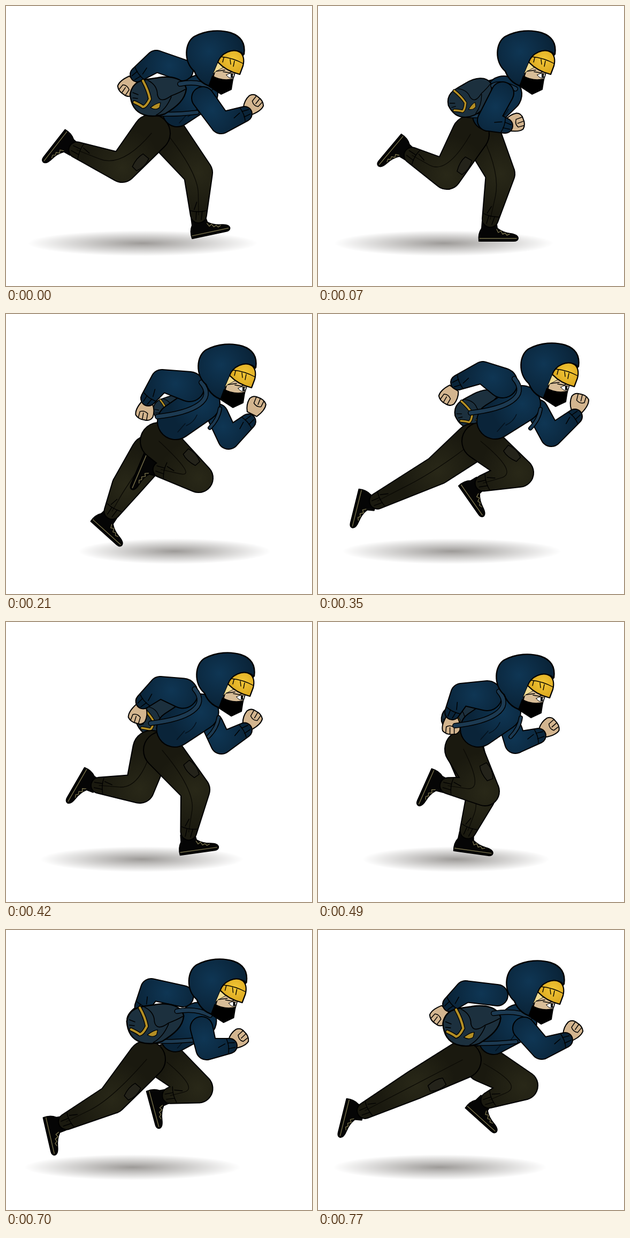
Animation of 572x524 px, one loop 0.84 s. Source, as an HTML page with a canvas:

```html
<!DOCTYPE html>
<html lang="en">
<head>
<meta charset="utf-8">
<title>Run cycle</title>
<style>
  html, body { margin: 0; height: 100%; overflow: hidden; background: #fff; }
  canvas { display: block; }
</style>
</head>
<body>
<canvas id="stage" width="572" height="524"></canvas>
<script>
const STEPS = 12, STEP_MS = 70;
const ctx = document.getElementById('stage').getContext('2d');
const { PI, cos, sin, atan2, acos, hypot } = Math;

// One row per step; an empty step is the mean of its neighbours.
const track = rows => Array.from({ length: STEPS }, (_, i) =>
  rows[i] || rows[i - 1].map((v, k) => (v + rows[i + 1][k]) / 2));

// hip x,y  knee x,y  ankle x,y  foot angle
const nearLeg = track([
  [272, 238, 217, 303, 124, 266, 128], [285, 240, 241, 316, 168, 275, 130], ,
  [286, 238, 360, 307, 281, 289, 113], , [304, 238, 376, 297, 300, 319, 55],
  [292, 240, 354, 314, 340, 402, -8], [275, 240, 304, 328, 277, 399, 8], ,
  [256, 241, 215, 344, 130, 383, 50], , [270, 243, 182, 289, 80, 342, 104]]);
const farLeg = track([
  [300, 238, 359, 312, 360, 400, -12], [308, 245, 341, 314, 320, 408, 0], ,
  [268, 262, 225, 322, 194, 377, 42], , [290, 240, 224, 292, 103, 354, 104],
  [272, 238, 250, 312, 165, 305, 120], [272, 238, 312, 317, 234, 305, 114], ,
  [292, 245, 335, 302, 286, 302, 108], , [310, 250, 384, 291, 311, 322, 42]]);

// shoulder x,y  elbow x,y  wrist x,y  hand x,y
const nearArm = track([
  [368, 172, 402, 219, 446, 202, 462, 185], [345, 163, 318, 214, 350, 224, 368, 219], ,
  [343, 136, 291, 124, 266, 158, 260, 181], , [345, 129, 308, 109, 262, 128, 245, 152], ,
  [316, 138, 268, 135, 251, 169, 249, 193], , [346, 182, 332, 224, 374, 228, 393, 219], ,
  [385, 184, 418, 222, 462, 206, 476, 189]]);
const farArm = track([
  [330, 120, 281, 103, 246, 128, 228, 150], [340, 155, 312, 162, 310, 178, 318, 190], ,
  [395, 188, 416, 233, 453, 201, 467, 173], , [410, 180, 436, 228, 480, 192, 488, 167], ,
  [362, 203, 369, 226, 412, 213, 432, 198], , [326, 126, 267, 107, 262, 148, 262, 165], ,
  [335, 122, 276, 115, 247, 139, 228, 160]]);

// chest x,y  waist x,y
const torso = track([
  [362, 163, 320, 199], [347, 165, 316, 205], , [366, 167, 317, 201], , [382, 168, 331, 200], ,
  [345, 169, 300, 200], , [344, 166, 305, 196], , [375, 173, 328, 206]]);
const head = track([[0, 0], [-2, 0], , [22, 10], , [42, 8], , [-4, 14], , [-6, 5], , [15, 11]]);
// x, y, angle, scale
const bag = track([
  [285, 170, 0, 1], [287, 173, -22, .85], , [312, 178, -10, .7], , [300, 179, -20, .85], ,
  [276, 178, -15, .86], , [271, 172, 0, 1], , [288, 180, 0, 1.03]]);
// centre x, half width
const shadow = track([[255, 215], [235, 205], , [315, 180], , [250, 205], , [258, 175], , [245, 205], , [228, 200]]);

const glow = (x, y, r, inner, outer) => {
  const g = ctx.createRadialGradient(x, y, 0, x, y, r);
  g.addColorStop(0, inner);
  g.addColorStop(1, outer);
  return g;
};
const cloth = (x, y) => glow(x, y, 60, '#0f3654', '#0a2439');
const pants = (x, y) => glow(x, y, 75, '#292818', '#1a190f');

function line(d, color = '#000', width = 1.6) {
  ctx.strokeStyle = color;
  ctx.lineWidth = width;
  ctx.stroke(new Path2D(d));
}
function shape(d, fill, width = 2) {
  ctx.fillStyle = fill;
  ctx.fill(new Path2D(d));
  if (width) line(d, '#000', width);
}
function strap(d, width = 7) {
  line(d, '#000', width + 3);
  line(d, '#1c3a52', width);
}
function place(x, y, angle, draw, scale = 1) {
  ctx.save();
  ctx.translate(x, y);
  ctx.rotate(angle);
  ctx.scale(scale, scale);
  draw();
  ctx.restore();
}

// Tapered tube through circles [x, y, r], with one common outline.
function tube(circles, fill) {
  const path = new Path2D();
  circles.slice(1).forEach(([bx, by, br], i) => {
    const [ax, ay, ar] = circles[i];
    const dir = atan2(by - ay, bx - ax), lean = acos((ar - br) / hypot(bx - ax, by - ay));
    const part = new Path2D();
    part.arc(ax, ay, ar, dir + lean, dir - lean + 2 * PI);
    part.arc(bx, by, br, dir - lean, dir + lean);
    part.closePath();
    path.addPath(part);
  });
  ctx.strokeStyle = '#000';
  ctx.lineWidth = 4;
  ctx.stroke(path);
  ctx.fillStyle = fill;
  ctx.fill(path);
}

function shoe() {
  shape('M-13,-5 L13,-5 L15,8 Q25,16 40,18 Q54,20 54,27 Q53,32 46,32 L-19,32 Q-21,18 -14,8Z', '#050505');
  line('M-18,27 L51,27', '#77704a', 1.4);
  line('M14,10 l3,6 5,-3 3,6 5,-2 3,4 5,-2', '#77704a', 1.4);
}

function leg([hx, hy, kx, ky, ax, ay, foot], withPocket) {
  const shin = atan2(ay - ky, ax - kx), thigh = atan2(ky - hy, kx - hx);
  const ex = ax - 9 * cos(shin), ey = ay - 9 * sin(shin);
  place(ax, ay, foot * PI / 180, shoe);
  tube([[hx, hy, 34], [kx, ky, 26], [ex, ey, 14]], pants(kx, ky));
  line(`M${hx},${hy} Q${kx},${ky} ${(kx + ex) / 2},${(ky + ey) / 2} T${ex},${ey}`, '#0b0a05', 1.3);
  place(ex, ey, shin, () => line('M-8,-15 Q-4,0 -8,15 M-7,-7 l16,2 M-6,4 l15,1 M-10,8 l-14,-5', '#000', 1.4));
  if (withPocket) place(hx + .62 * (kx - hx), hy + .62 * (ky - hy), thigh, () =>
    shape('M-13,-27 Q4,-32 19,-24 L18,-13 Q0,-8 -13,-13Z', '#24231a', 1.4));
}

function fist() {
  shape('M-16,-10 Q-5,-18 8,-17 Q17,-14 17,-4 Q19,8 12,15 Q2,19 -16,10Z', '#d3b58f');
  line('M16,-7 L4,-6 M17,1 L5,2 M15,9 L4,9 M4,-6 Q-1,2 4,9', '#000', 1.5);
}

function arm([sx, sy, ex, ey, wx, wy, hx, hy], shoulder) {
  place(hx, hy, atan2(hy - wy, hx - wx), fist);
  tube([[sx, sy, shoulder], [ex, ey, 19], [wx, wy, 13]], cloth((sx + ex) / 2, (sy + ey) / 2));
  place(wx, wy, atan2(wy - ey, wx - ex), () =>
    line('M-4,-14 Q0,0 -4,14 M-3,-6 l13,1 M-3,5 l13,-1 M-8,-5 l-13,5', '#000', 1.5));
}

function backpack([x, y, angle, scale]) {
  place(x, y, angle * PI / 180, () => {
    shape('M-53,-5 C-48,-35 -20,-32 0,-36 C25,-40 48,-34 52,-15 C50,5 35,18 12,32 C-10,40 -50,40 -53,-5Z', '#1c303e', 2.4);
    line('M-20,-31 Q-2,-22 -2,-4 Q2,14 24,-2 M24,-2 Q40,-8 50,-14 M-4,34 Q14,24 24,0 M-48,-8 l10,4 M-48,2 l9,1');
    const trim = 'M-29,-30 Q-19,-12 -16,4 Q-23,18 -29,19 Q-34,15 -45,10';
    line(trim, '#000', 7);
    line(trim, '#b48f25', 4.2);
    shape('M4,11 Q-3,11 -15,20 Q-5,26 2,20Z', '#b48f25', 1.2);
  }, scale);
}

function face() {
  shape('M352,122 C331,104 334,68 352,57 C375,45 400,44 420,50 C438,56 448,68 445,90 L390,152 Q362,148 352,122Z', cloth(380, 85), 2.4);
  shape('M445,90 C438,80 415,82 404,92 C392,105 388,130 381,150 L395,156 L425,125Z', '#04070a', 0);
  shape('M397,103 L428,126 L424,139 L386,138Z', '#d8bd98', 1.2);
  shape('M396,106 L408,114 L393,122 L387,127Z', '#f0db92', .8);
  shape('M386,131 Q402,141 424,137 L421,156 L402,165 L379,150Z', '#000');
  shape('M412,129 Q419,124 427,128 L424,135 Q416,136 412,129Z', '#fff', 1);
  shape('M420,127 h4 v7 h-4Z', '#000', 0);
  line('M406,123 L418,125 L428,121 M393,122 L409,120', '#000', 1.6);
  shape('M396,105 C402,88 424,78 438,87 C447,95 444,108 443,112 L437,128 Q412,122 396,105Z', glow(424, 100, 30, '#f2c636', '#d9a51d'), 2.2);
  line('M402,95 Q424,97 444,108 M407,97 l-2,8 M419,100 l1,9 M427,103 l-2,10', '#000', 1.4);
}

function draw(step) {
  ctx.fillStyle = '#fff';
  ctx.fillRect(0, 0, 572, 524);
  const [shx, shw] = shadow[step];
  ctx.save();
  ctx.translate(shx, 444);
  ctx.scale(shw / 24, 1);
  ctx.fillStyle = glow(0, 0, 24, 'rgba(60,55,50,.5)', 'rgba(60,55,50,0)');
  ctx.fillRect(-24, -24, 48, 48);
  ctx.restore();

  const bagInFront = step < 3 || step > 8;
  const [cx, cy, wx, wy] = torso[step], [sx, sy] = nearArm[step], [bx, by] = bag[step];
  arm(farArm[step], 19);
  if (!bagInFront) backpack(bag[step]);

  const legs = [farLeg[step], nearLeg[step]];
  if (step === 7) legs.reverse();
  leg(legs[0], false);
  leg(legs[1], true);

  tube([[cx, cy, 33], [wx, wy, bagInFront ? 26 : 33]], cloth(cx, cy));
  line(`M${wx + 4},${wy + 20} l14,-16 M${wx + 20},${wy + 8} q14,-6 20,-20`, '#04101b', 1.4);
  if (bagInFront) {
    strap(`M${bx - 8},${by + 32} Q${bx + 30},${by + 34} ${cx - 5},${cy + 36}`, 6);
    backpack(bag[step]);
    strap(`M${bx + 40},${by - 24} Q${cx - 5},${cy - 24} ${cx + 22},${cy - 10}`);
  } else {
    strap(`M${cx + 34},${cy + 10} Q${cx + 31},${cy + 30} ${cx + 15},${cy + 46}`, 5);
  }
  arm(nearArm[step], bagInFront ? 20 : 27);
  if (!bagInFront) strap(`M${sx - 60},${sy + 56} C${sx + 10},${sy + 48} ${sx + 50},${sy + 25} ${sx + 22},${sy - 8}`);
  place(...head[step], 0, face);
}

ctx.lineJoin = ctx.lineCap = 'round';
function tick() {
  draw(Math.floor(performance.now() / STEP_MS) % STEPS);
  requestAnimationFrame(tick);
}
tick();
</script>
</body>
</html>
```
